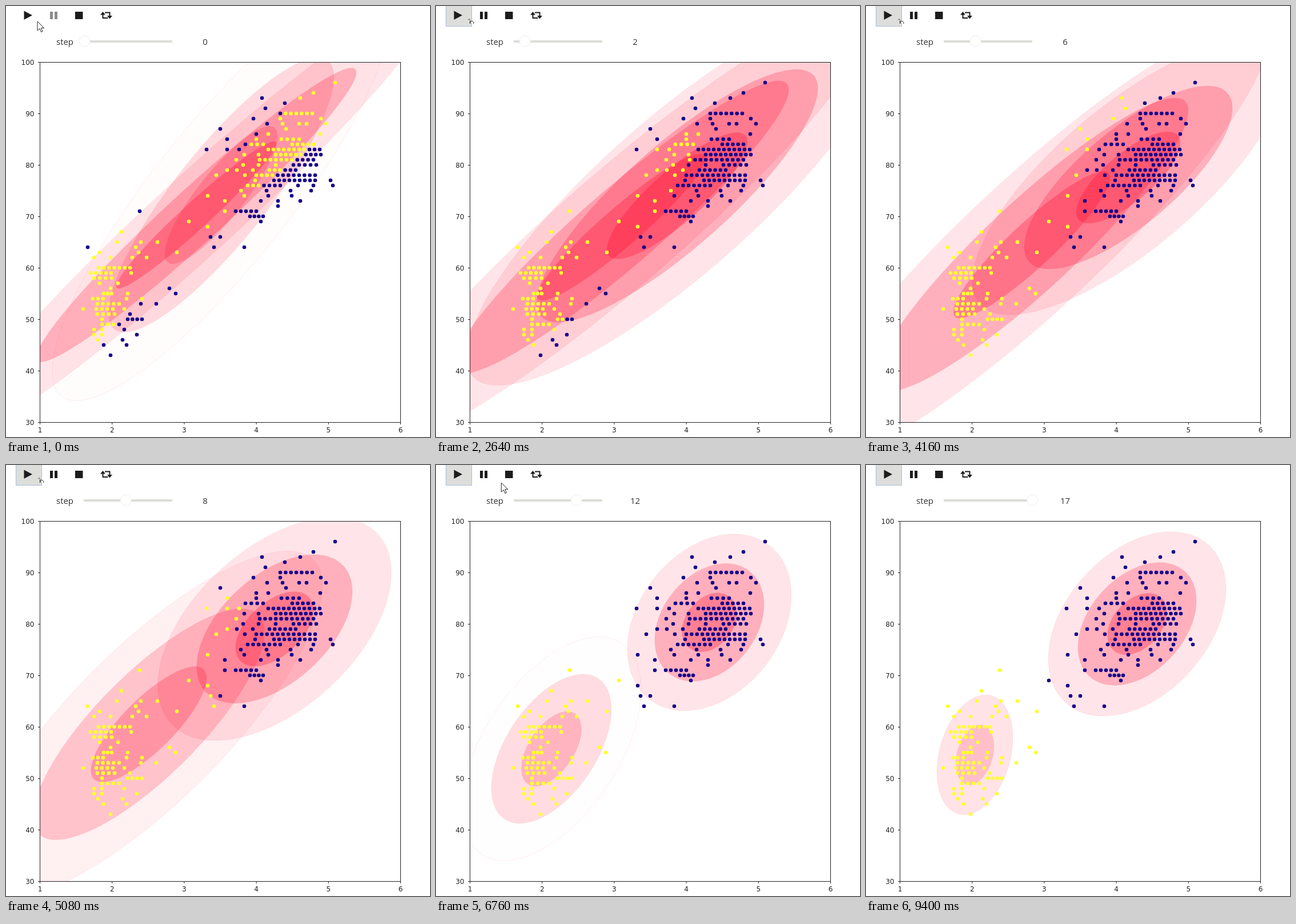
Write an HTML page that moves like this. It is 742 px wide and 754 px high and loops after 9480 ms.

```html
<!DOCTYPE html>
<html lang="en">
<head>
<meta charset="utf-8">
<title>Two-cluster fit, step by step</title>
<style>
  html, body { margin: 0; width: 100%; height: 100%; overflow: hidden; background: #fff; }
  svg { display: block; }
  .axis text { font: 12px "DejaVu Sans", sans-serif; fill: #262626; }
  .ui text { font: 15px "Open Sans", "Noto Sans", sans-serif; fill: #333; }
  .axis path, .axis rect { fill: none; stroke: #222; stroke-width: 1; }
</style>
</head>
<body>
<svg id="stage" width="742" height="754" viewBox="0 0 742 754">
  <defs><clipPath id="plot"><rect x="60" y="98.5" width="630" height="630"/></clipPath></defs>
  <g class="ui">
    <g id="pressed">
      <rect x="17" y="0" width="46" height="36" fill="#dddedb"/>
      <rect x="17.5" y="-.5" width="45" height="36" fill="none" stroke="#7f9be0" stroke-dasharray="1 1"/>
    </g>
    <path d="M31.5 8.5V24L46 16.2Z" fill="#1c1c1c"/>
    <path id="pause" d="M77 10h5v13h-5zM85 10h5v13h-5z"/>
    <path d="M121 10h13.5v13H121z" fill="#1c1c1c"/>
    <path d="M169.500 14v7h9M173 11.500h8.500v7" fill="none" stroke="#1c1c1c" stroke-width="2"/>
    <path d="M165 15.500l4.500-5.500 4.500 5.500zM177 17l4.500 5.500L186 17z" fill="#1c1c1c"/>
    <text x="88" y="68">step</text>
    <rect x="136" y="60" width="155" height="4" fill="#dcddd8"/>
    <circle id="knob" cy="61.500" r="9.500" fill="#fff" stroke="#eee"/>
    <text id="count" x="348.500" y="68" text-anchor="middle">0</text>
  </g>
  <g id="blobs" clip-path="url(#plot)"></g>
  <g id="dots"></g>
  <g id="axis" class="axis"><rect x="59.500" y="98.500" width="631" height="630"/></g>
  <g id="cursor" fill="#fff" stroke="#222" stroke-linejoin="round">
    <path id="arrow" d="M0 0V16L4 12.500 6.500 18.500 9 17.500 6.500 11.500H11.500Z"/>
    <path id="hand" d="M-1.500 1.500C-1.500-.5 1.500-.5 1.500 1.500V8C3-.5+7.500 5.500 7.500 5 8 5 7.500 7 8 8 8.500 11 7.500 11 10V15C11 18 9 19 9 22.500H0C-.5 19-6 15-6 12 -5 10-3 11-1.500 13Z"/>
  </g>
</svg>
<script>
const LOOP = 9480, PRESS = 1560, START = 1640, STEP_MS = 400, LAST_STEP = 17;
const $ = id => document.getElementById(id);

function add(parent, tag, attrs, text) {
  const el = document.createElementNS("http://www.w3.org/2000/svg", tag);
  for (const name in attrs) el.setAttribute(name, attrs[name]);
  if (text !== undefined) el.textContent = text;
  return parent.appendChild(el);
}

// One row per unit from 96 down; a pair is an evenly spaced run of dots.
const rows = [
  [576], [], [538], [448, 515], [488], [454], [[480, 536]], [433, 480, 551],
  [457, 484, [513, 526], 560], [375, 490], [438, 459, 550], [387, 438, [482, 513]],
  [[419, 450], [501, 538]], [351, 387, 408, [459, 549]], [417, 442, [472, 551]],
  [403, [444, 538]], [415, 442, 472, [503, 543]], [387, 404, 432, [461, 507]],
  [368, 418, [438, 541]], [436, [469, 541], 568], [[423, 480], 511, 538, 572],
  [411, 456, 498, 534], [353, 417, 459, 500], [383, 446, 476, 515], [476],
  [234, 383, [402, 438]], [[427, 450]], [320, 446], [353], [202], [358, 375],
  [194, 236, 265], [143, 227, 364, 417], [164, 232, 299], [154, 183, 221, 246], [],
  [[162, 217]], [[148, 184], 219], [[154, 185]], [164, 196], [183, 286],
  [[171, 185], 213, 297], [[152, 170], 211, 238], [[160, 198], 236, 263],
  [135, [158, 187], 207], [[160, 190], 217], [168, [213, 238]], [[168, 198]],
  [154, 168, 207], [154, 168, 229], [161, 204], [171, 211], [], [183]
];

function spread(run) {
  if (!Array.isArray(run)) return [run];
  const [from, to] = run, gaps = Math.max(1, Math.round((to - from) / 9));
  return Array.from({ length: gaps + 1 }, (_, i) => from + (to - from) * i / gaps);
}

const dots = rows.flatMap((row, i) => row.flatMap(spread).map(x => {
  const y = 134 + 9 * i;
  return { x, y, el: add($("dots"), "circle", { cx: x, cy: y, r: 3.3 }) };
}));

// Gaussians: cx, cy, sigma x, sigma y, correlation, fade. Region: outline holding the yellow dots.
const keys = [
  { step: 0, a: [376.5, 330.5, 98.5, 120, .86, .09], b: [333, 365.5, 140, 128.5, .97, 0],
    region: [[130, 434], [218, 377], [360, 283], [412, 255], [482, 192], [600, 55], [600, 200], [467, 296], [355, 395], [130, 625]] },
  { step: 2, a: [422, 332, 123, 110.5, .85, 0], b: [323.7, 387, 146.7, 128, .94, 0],
    region: [[100, 430], [218, 340], [340, 270], [385, 243], [435, 215], [475, 212], [450, 262], [412, 330], [355, 395], [130, 660]] },
  { step: 6, a: [459, 300, 91, 80, .76, 0], b: [290, 417.7, 137, 128.3, .915, 0],
    region: [[100, 430], [218, 300], [330, 200], [385, 150], [440, 140], [485, 125], [440, 212], [380, 285], [355, 410], [130, 800]] },
  { step: 10, a: [481, 273.5, 45.1, 50, .25, 0], b: [209.5, 489.5, 65.2, 73.7, .69, .08],
    region: [[100, 430], [218, 320], [330, 310], [345, 315], [352, 320], [360, 325], [375, 345], [380, 380], [385, 440], [130, 800]] },
  { step: 15, a: [474.5, 278, 51.8, 53.7, .38, 0], b: [190.5, 507, 33.2, 52.4, .285, .12],
    region: [[100, 430], [218, 320], [260, 330], [280, 340], [290, 350], [300, 360], [305, 375], [310, 400], [330, 440], [130, 900]] }
];

const mix = (p, q, f) => Array.isArray(p) ? p.map((v, i) => mix(v, q[i], f)) : p + (q - p) * f;

function modelAt(step) {
  const s = Math.min(step, 15);
  const i = Math.max(1, keys.findIndex(k => k.step >= s));
  const p = keys[i - 1], q = keys[i], f = (s - p.step) / (q.step - p.step);
  return { a: mix(p.a, q.a, f), b: mix(p.b, q.b, f), region: mix(p.region, q.region, f) };
}

function inside(x, y, poly) {
  let hit = false;
  poly.forEach(([x1, y1], i) => {
    const [x2, y2] = poly[(i + 1) % poly.length];
    if ((y1 > y) !== (y2 > y) && x < x1 + (x2 - x1) * (y - y1) / (y2 - y1)) hit = !hit;
  });
  return hit;
}

const layers = [[3, .1], [2, .23], [1, .28]];
const blobs = ["a", "b"].flatMap(name => layers.map(([sigma, alpha]) => ({
  name, sigma, alpha,
  el: add($("blobs"), "circle", {
    r: 1, fill: "rgb(255,0,40)", stroke: "rgb(255,0,40)", "stroke-opacity": .08, "vector-effect": "non-scaling-stroke"
  })
})));

for (let v = 30; v <= 100; v += 10) {
  const y = 728.5 - (v - 30) * 9;
  add($("axis"), "path", { d: `M56 ${y}h4` });
  add($("axis"), "text", { x: 49.5, y: y + 4.5, "text-anchor": "end" }, v);
}
for (let v = 1; v <= 6; v++) {
  const x = 59.5 + (v - 1) * 126.2;
  add($("axis"), "path", { d: `M${x} 728v4` });
  add($("axis"), "text", { x, y: 746, "text-anchor": "middle" }, v);
}

function showStep(step) {
  const model = modelAt(step);
  for (const { name, sigma, alpha, el } of blobs) {
    const [cx, cy, sx, sy, rho, fade] = model[name];
    const w = sigma * sx, h = sigma * sy, opacity = Math.max(0, alpha - fade);
    el.setAttribute("transform", `matrix(${w} ${-h * rho} 0 ${-h * Math.sqrt(1 - rho * rho)} ${cx} ${cy})`);
    el.setAttribute("fill-opacity", opacity);
    el.setAttribute("stroke-opacity", opacity ? .08 : 0);
  }
  for (const { x, y, el } of dots) {
    el.setAttribute("fill", inside(x, y, model.region) ? "#ffff30" : "#17008c");
  }
  $("knob").setAttribute("cx", 137.5 + step * 9.03);
  $("count").textContent = step;
}

// time, x, y
const track = [
  [0, 55, 27], [500, 55, 27], [900, 56, 43], [1440, 56, 43], [1540, 58, 23],
  [6600, 58, 23], [7150, 330, 62], [7700, 555, 48], [7900, 555, 48], [8350, 745, 30], [LOOP, 745, 30]
];

function cursorAt(t) {
  const i = track.findIndex(k => k[0] > t), p = track[i - 1], q = track[i];
  const f = (t - p[0]) / (q[0] - p[0]);
  return mix(p, q, f * f * (3 - 2 * f)).slice(1);
}

const show = (el, on) => el.setAttribute("visibility", on ? "visible" : "hidden");
let shown = -1;

function draw(now) {
  const t = now % LOOP, playing = t >= PRESS;
  const step = Math.min(LAST_STEP, Math.max(0, Math.floor((t - START) / STEP_MS)));
  if (step !== shown) showStep(shown = step);
  const overButton = playing && t < 6640;
  show($("pressed"), playing);
  show($("hand"), overButton);
  show($("arrow"), !overButton);
  $("pause").setAttribute("fill", playing ? "#1c1c1c" : "#8c8c8c");
  $("cursor").setAttribute("transform", `translate(${cursorAt(t)})`);
}

const origin = performance.now();
function tick() {
  draw(performance.now() - origin);
  requestAnimationFrame(tick);
}
tick();
</script>
</body>
</html>
```
